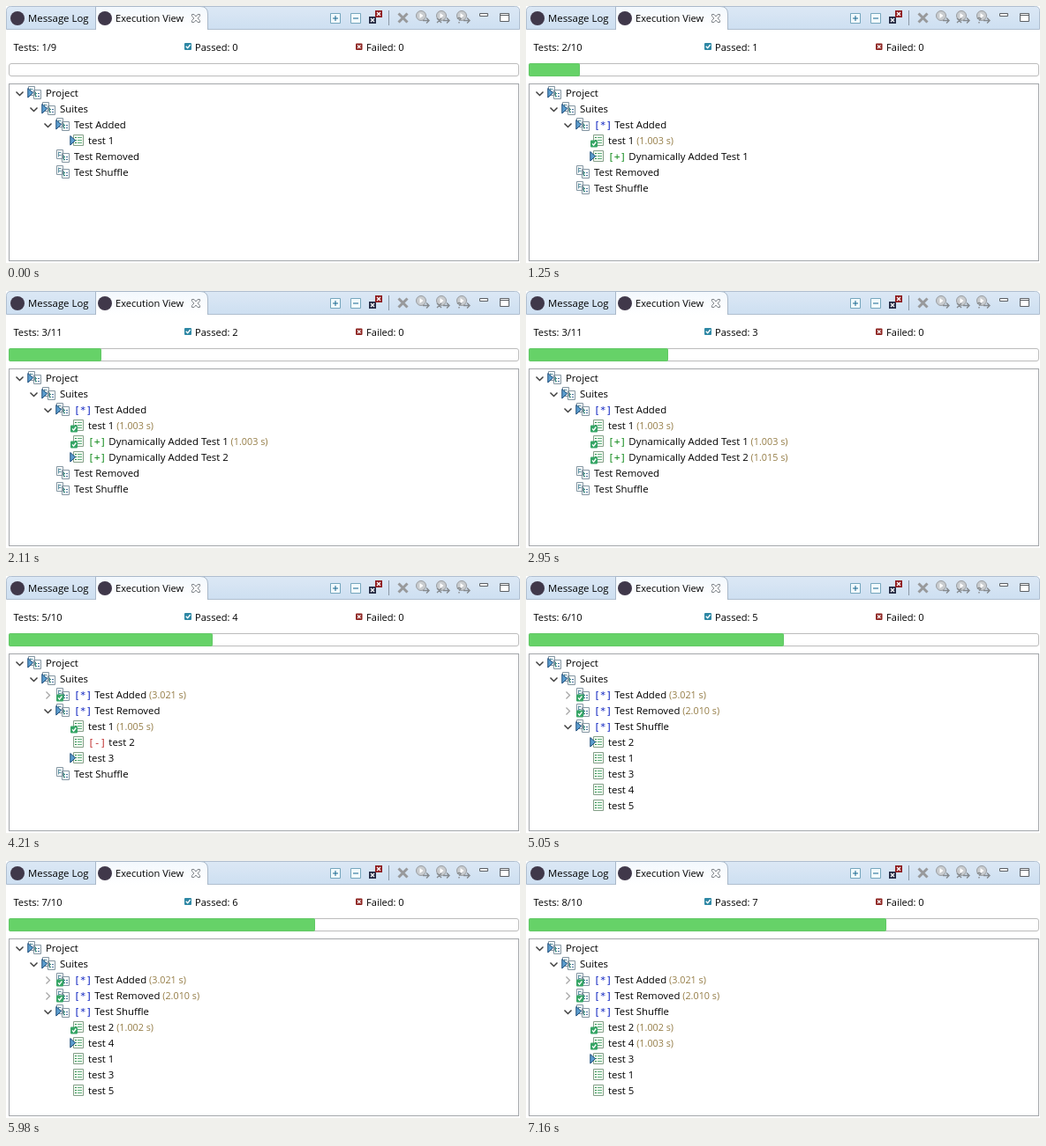
Recreate the animation shown at these times as an HTML page. Size 582 px wide and 292 px high, loop 8 s.

```html
<!DOCTYPE html>
<html lang="en">
<head>
<meta charset="utf-8">
<title>Execution View</title>
<style>
  html, body { margin: 0; width: 100%; height: 100%; overflow: hidden; background: #fff; }
  svg { display: block; width: 582px; height: 292px; }
  text { font: 11.4px "Open Sans", sans-serif; fill: #000; white-space: pre; }
  .small { font-size: 11.1px; }
  .mark { font: 11.3px "DejaVu Sans Mono", monospace; }
  .time { font-size: 10.8px; fill: #957d47; }
</style>
</head>
<body>
<svg viewBox="0 0 582 292" xmlns="http://www.w3.org/2000/svg">
  <defs>
    <linearGradient id="bar" x2="0" y2="1">
      <stop offset="0" stop-color="#dce8f5"/><stop offset="1" stop-color="#cddff1"/>
    </linearGradient>
    <linearGradient id="tab" x2="0" y2="1">
      <stop offset="0" stop-color="#f3f8fd"/><stop offset="1" stop-color="#fff"/>
    </linearGradient>
    <!-- Tree icons: origin at the left edge and vertical centre of the row -->
    <g id="suite" stroke="#8496a2" fill="#fff">
      <path d="M1.500-7.500h7v10h-7zM7.500-3.500h8v10h-8z"/>
      <path d="M3.500-5.500v6M3.500-4.500h3M3.500-1.500h3" stroke="#5b8fa0"/>
      <path d="M9.500-1.500v6M9.500.5h1.500M9.500 3.500h1.500" stroke="#3d8a80"/>
      <path d="M12 .5h2M12 3.500h2" stroke="#46709c"/>
    </g>
    <g id="test" fill="none">
      <path d="M4.500-6.500h11v12h-11z" fill="#f6fbf3" stroke="#86a08a"/>
      <path d="M6-3.500h2M6-.5h2M6 2.500h2" stroke="#2d8c50"/>
      <path d="M9-3.500h5M9-.5h5M9 2.500h5" stroke="#5fae7c"/>
    </g>
    <path id="run" d="M.8-5.500 6.500-.3.8 5z" fill="#5d9fd0" stroke="#1b4a78"/>
    <g id="pass">
      <rect x="1" y="-.5" width="8" height="8" rx="1" fill="#35a565"/>
      <path d="M3 3.300 4.600 5.200 7.300 1.500" fill="none" stroke="#fff" stroke-width="1.300"/>
    </g>
    <path id="open" d="M-3.500-1.500.5 2.500 4.500-1.500" fill="none" stroke="#404040" stroke-width="1.500"/>
    <path id="closed" d="M-1.500-3.500 2.500.5-1.500 4.500" fill="none" stroke="#a6a6a6" stroke-width="1.300"/>
    <g id="play">
      <circle cx="6" cy="6" r="5.500" fill="#c9cccf" stroke="#999da1"/>
      <path d="M4.500 3v6l4-3z" fill="#fff"/>
    </g>
  </defs>

  <rect width="582" height="292" fill="#fff"/>
  <path d="M.5 26.500V5.500Q.5.5 5.500.5H576.500Q581.500.5 581.500 5.500V26.500z" fill="url(#bar)" stroke="#b0bfd0"/>
  <path d="M101.500 27V.5H220Q228.500.5 228.500 9V27" fill="url(#tab)" stroke="#a9b8c9"/>

  <g fill="#40384a"><circle cx="13" cy="14" r="8"/><circle cx="112" cy="14" r="8"/></g>
  <text x="25" y="18">Message Log</text>
  <text class="small" x="124" y="18">Execution View</text>
  <path d="M210.500 9.500h2.500l2 2.500 2-2.500h2.500v2l-2.500 2.500 2.500 2.500v2h-2.500l-2-2.500-2 2.500h-2.500v-2l2.500-2.500-2.500-2.500z" fill="#fff" stroke="#81868c"/>

  <g fill="#f2fafd" stroke="#76a6bd">
    <path d="M367.500 8.500h11v11h-11zM390.500 8.500h11v11h-11z"/>
    <path d="M370 14h6M373 11v6M393 14h6" stroke="#17668f"/>
  </g>
  <rect x="411" y="12" width="8" height="8" fill="#252b44"/>
  <rect x="418" y="5" width="8" height="8" fill="#8f1d20"/>
  <path d="M413 14l4 4m0-4-4 4M420 7l4 4m0-4-4 4" stroke="#fff" stroke-width="1.300"/>
  <path d="M433.500 5V22" stroke="#8c98a5"/>
  <path d="M444.500 8.500l10 10m0-10-10 10" stroke="#98999b" stroke-width="3"/>
  <use href="#play" x="464" y="5"/><use href="#play" x="487" y="5"/><use href="#play" x="510" y="5"/>
  <g fill="none" stroke="#85898d" stroke-width="1.400">
    <path d="M472 16.500h7m-3-3 3 3-3 3M495 16.500h7m-3-3 3 3-3 3M518 16.500h7m-3-3 3 3-3 3"/>
    <path d="M488 14l5 5m0-5-5 5M511 14.500q2-2 4 0L513 16.500m0 1.500v1.500"/>
  </g>
  <g fill="#fff" stroke="#5c6065">
    <path d="M536.500 8.500h9v3h-9zM559.500 8.500h10v9h-10zM559.500 10.500h10"/>
  </g>

  <rect x="202" y="42" width="8" height="8" rx="1" fill="#2d87a4"/>
  <path d="M203.700 45.700l2 2 3-3.700" fill="none" stroke="#fff" stroke-width="1.300"/>
  <rect x="396" y="42.500" width="7.500" height="7.500" rx="1" fill="#8f2724"/>
  <path d="M398 44.500l3.500 3.500m0-3.500-3.500 3.500" stroke="#fff" stroke-width="1.200"/>
  <text class="small" x="408" y="51">Failed: 0</text>

  <rect x="3.500" y="65.500" width="577" height="14" rx="2.500" fill="#fff" stroke="#bcbcbc"/>
  <rect x="3.500" y="88.500" width="577" height="201" fill="#fff" stroke="#a3a6aa"/>
  <g id="views"></g>
</svg>
<script>
const LOOP = 8000;
const MARK_COLORS = { "*": "#0a1fc0", "+": "#128a1c", "-": "#c03030" };

// Row: [depth, label, status, mark, time, collapsed]
const head = [[0, "Project", "run"], [1, "Suites", "run"]];
const suite = (name, status, mark, time) => [2, name, status, mark, time, status === "pass"];
const test = (name, status, time, mark) => [3, name, status, mark, time];

const removed = suite("Test Removed");
const shuffle = suite("Test Shuffle");
const adding = suite("Test Added", "run", "*");
const added = suite("Test Added", "pass", "*", "3.021");
const removedDone = suite("Test Removed", "pass", "*", "2.010");
const shuffling = suite("Test Shuffle", "run", "*");
const first = test("test 1", "pass", "1.003");
const extra = (n, status, time) => test("Dynamically Added Test " + n, status, time, "+");

const states = [
  { at: 0, started: 1, total: 9, passed: 0,
    rows: [suite("Test Added", "run"), test("test 1", "run"), removed, shuffle] },
  { at: 1250, started: 2, total: 10, passed: 1,
    rows: [adding, first, extra(1, "run"), removed, shuffle] },
  { at: 2110, started: 3, total: 11, passed: 2,
    rows: [adding, first, extra(1, "pass", "1.003"), extra(2, "run"), removed, shuffle] },
  { at: 2950, started: 3, total: 11, passed: 3,
    rows: [adding, first, extra(1, "pass", "1.003"), extra(2, "pass", "1.015"), removed, shuffle] },
  { at: 3030, started: 4, total: 11, passed: 3,
    rows: [added, suite("Test Removed", "run"), test("test 1", "run"), test("test 2"), test("test 3"), shuffle] },
  { at: 4210, started: 5, total: 10, passed: 4,
    rows: [added, suite("Test Removed", "run", "*"), test("test 1", "pass", "1.005"),
      test("test 2", "", "", "-"), test("test 3", "run"), shuffle] },
  { at: 5050, started: 6, total: 10, passed: 5,
    rows: [added, removedDone, shuffling, test("test 2", "run"),
      ...[1, 3, 4, 5].map(n => test("test " + n))] },
  { at: 5980, started: 7, total: 10, passed: 6,
    rows: [added, removedDone, shuffling, test("test 2", "pass", "1.002"), test("test 4", "run"),
      ...[1, 3, 5].map(n => test("test " + n))] },
  { at: 7160, started: 8, total: 10, passed: 7,
    rows: [added, removedDone, shuffling, test("test 2", "pass", "1.002"), test("test 4", "pass", "1.003"),
      test("test 3", "run"), test("test 1"), test("test 5")] },
];

const use = (id, x, y) => `<use href="#${id}" x="${x}" y="${y}"/>`;

function drawRow([depth, label, status, mark, time, collapsed], index, rows) {
  const x = 24 + 16 * depth, y = 99 + 18 * index;
  const next = rows[index + 1];
  const arrow = collapsed ? "closed" : next && next[0] > depth ? "open" : "";
  const prefix = mark ? `<tspan class="mark" style="fill:${MARK_COLORS[mark]}">[${mark}]</tspan> ` : "";
  const suffix = time ? `<tspan class="time"> (${time} s)</tspan>` : "";
  return (arrow && use(arrow, x - 9, y)) +
    use(depth === 3 ? "test" : "suite", x, y) +
    (status ? use(status, x, y) : "") +
    `<text x="${x + 21}" y="${y + 4}">${prefix}${label}${suffix}</text>`;
}

function drawProgress(share) {
  const width = Math.round(578 * share);
  return width ? `<rect x="3.500" y="65.500" width="${width - 1}" height="14" rx="1" fill="#66d268" stroke="#62c865"/>` : "";
}

function drawState({ started, total, passed, rows }) {
  return `<g display="none">
    <text class="small" x="8.500" y="51">Tests: ${started}/${total}</text>
    <text class="small" x="214" y="51">Passed: ${passed}</text>
    ${drawProgress(passed / total)}
    ${[...head, ...rows].map(drawRow).join("")}</g>`;
}

const views = document.getElementById("views");
views.innerHTML = states.map(drawState).join("");

let shown = -1;
function tick() {
  const time = performance.now() % LOOP;
  const current = states.findLastIndex(state => state.at <= time);
  if (current !== shown) {
    [...views.children].forEach((view, i) => view.setAttribute("display", i === current ? "inline" : "none"));
    shown = current;
  }
  requestAnimationFrame(tick);
}
tick();
</script>
</body>
</html>
```
